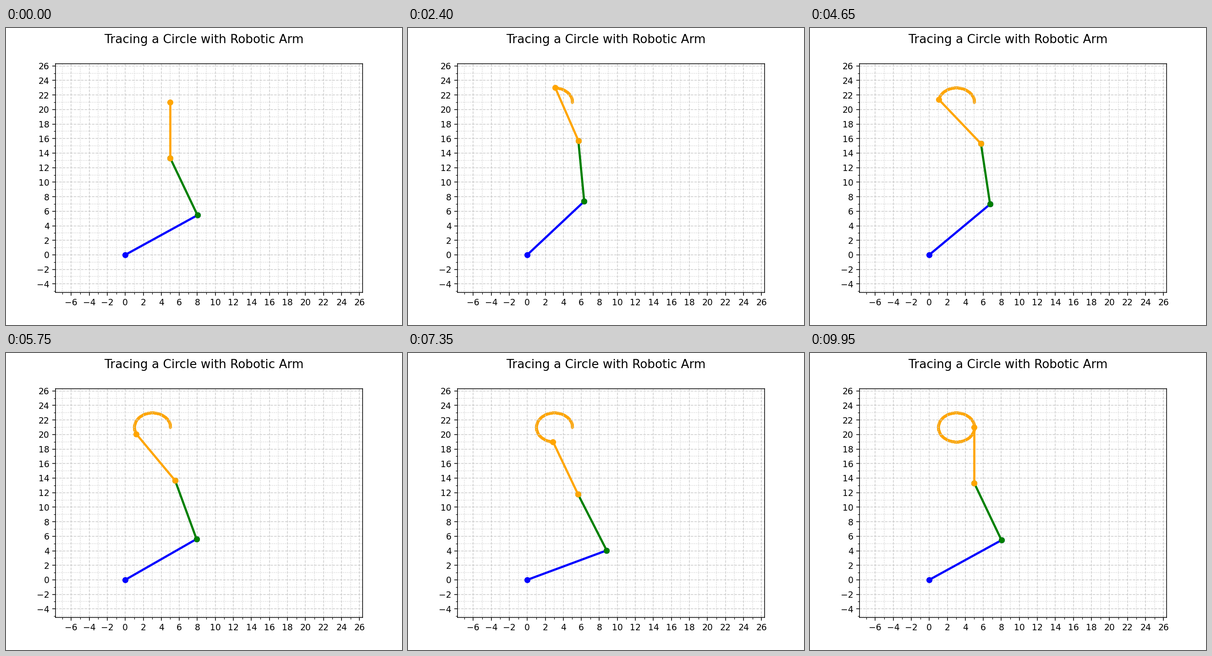
Animation, 864 px wide and 648 px high, one loop 10000 ms. Source, as a matplotlib script:

```python
import numpy as np
import matplotlib.pyplot as plt
from matplotlib.animation import FuncAnimation
from matplotlib.ticker import MultipleLocator

FRAMES = 200
INTERVAL = 50
L1, L2, L3 = 9.7, 8.4, 7.7
REACH = L1 + L2 + L3
CENTER, RADIUS = np.array([3, 21]), 2


def polar(length, angle):
    return length * np.array([np.cos(angle), np.sin(angle)])


def solve_arm(target, phi):
    """Joint positions for a tip target and a last-link heading."""
    wrist = target - polar(L3, phi)
    dist = np.hypot(*wrist)
    bend = np.arccos((L1**2 + dist**2 - L2**2) / (2 * L1 * dist))
    elbow = polar(L1, np.arctan2(wrist[1], wrist[0]) - bend)
    return np.array([(0, 0), elbow, wrist, target])


angles = np.linspace(0, 2 * np.pi, FRAMES)
path = CENTER + RADIUS * np.column_stack([np.cos(angles), np.sin(angles)])

# The last link tilts from 90 to 130 degrees and back.
tilt = np.linspace(90, 130, FRAMES // 2)
headings = np.radians(np.concatenate([tilt, tilt[::-1]]))

fig, ax = plt.subplots(figsize=(6.4, 4.8), dpi=135)
fig.suptitle("Tracing a Circle with Robotic Arm", fontsize=14)
ax.set_xlim(-0.3 * REACH, 1.02 * REACH)
ax.set_ylim(-0.2 * REACH, 1.02 * REACH)
for axis in (ax.xaxis, ax.yaxis):
    axis.set_major_locator(MultipleLocator(2))
    axis.set_minor_locator(MultipleLocator(1))
ax.grid(which="major", color="#CCCCCC", linestyle="--")
ax.grid(which="minor", color="#CCCCCC", linestyle=":")

trace = ax.scatter([], [], s=5, color="orange")
links = [ax.plot([], [], "o-", color=color, linewidth=2.5)[0]
         for color in ("blue", "green", "orange")]


def update(i):
    joints = solve_arm(path[i], headings[i])
    for k, link in enumerate(links):
        link.set_data(joints[k:k + 2, 0], joints[k:k + 2, 1])
    trace.set_offsets(path[:i + 1])
    return [trace, *links]


anim = FuncAnimation(fig, update, frames=FRAMES, interval=INTERVAL, repeat=True)
plt.show()
```
